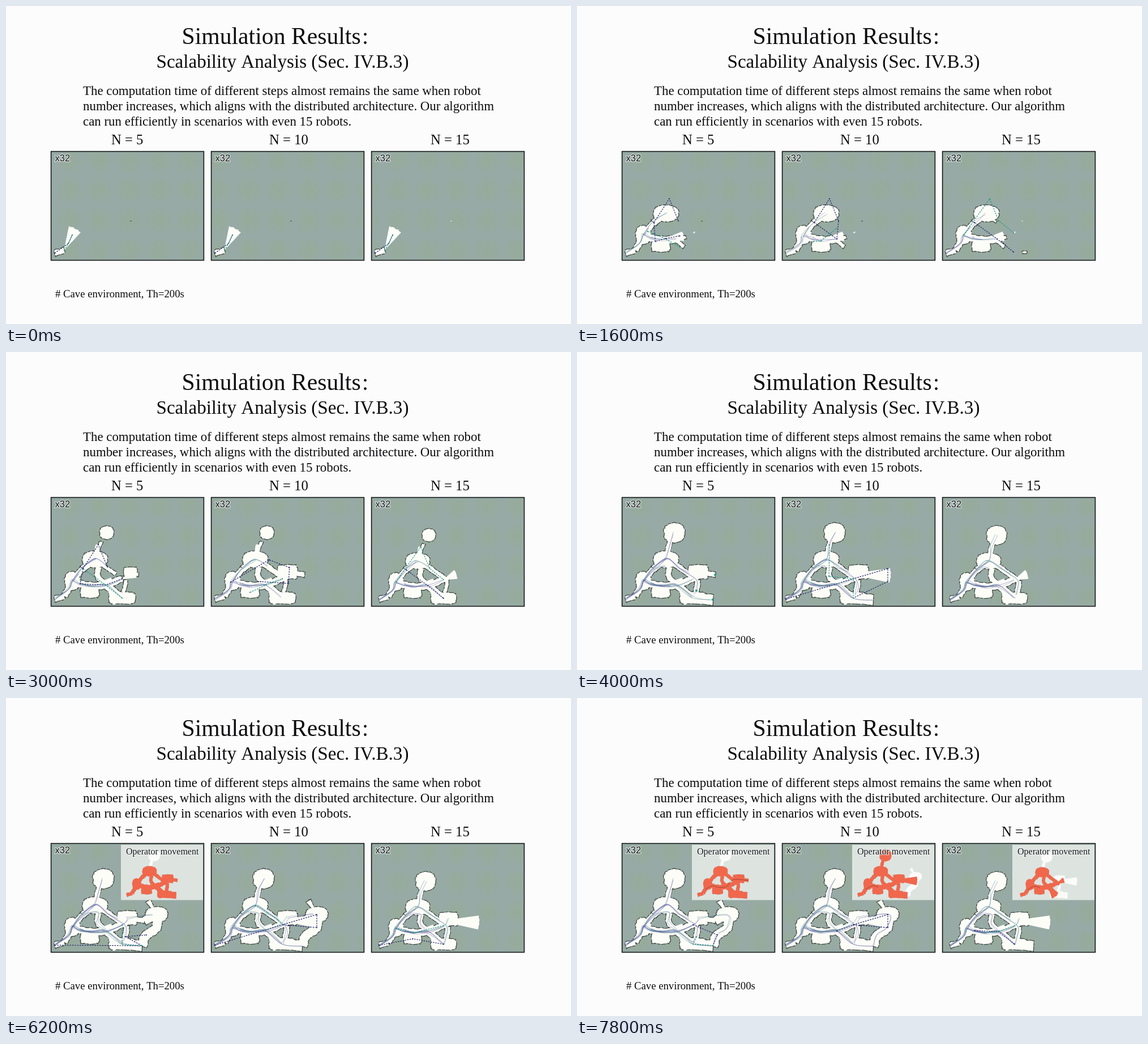
These frames come from a looping animation (998 by 561 pixels, 8 s). An HTML page with a canvas:

```html
<!DOCTYPE html>
<html lang="en">
<head>
<meta charset="utf-8">
<title>Scalability Analysis</title>
<style>
html, body { margin: 0; width: 100%; height: 100%; overflow: hidden; background: #fcfcfd; }
canvas { display: block; width: 998px; height: 561px; }
</style>
</head>
<body>
<canvas id="stage" width="998" height="561"></canvas>
<script>
const ctx = document.getElementById('stage').getContext('2d');
const LOOP = 8000, STEP = 200, GROW = 600, NEVER = 1e6;
const SERIF = '"Liberation Serif", serif', SANS = '"Liberation Sans", sans-serif';
const NAVY = '#25256f', TEAL = '#1f9a86', RED = '#f0674c', FREE = '#fdfdf8';
const PITCH = 283;

const clamp = v => Math.max(0, Math.min(1, v));
const noise = n => { const s = Math.sin(n * 127.1 + 11.7) * 43758.5453; return s - Math.floor(s) - 0.5; };

// Waypoints of the cave; every corridor, track and link is a word of these letters.
const way = {
  E: [86, 436], K: [103, 431], J: [110, 419], L: [117, 404], N: [136, 382], C: [157, 366], H: [163, 340], T: [172, 319],
  M: [131, 409], B: [150, 413], D: [176, 411], P: [148, 424], Q: [164, 379], O: [162, 396], U: [179, 379], X: [197, 391],
  V: [213, 402], Z: [211, 421], W: [205, 400], R: [214, 388], I: [244, 393], S: [205, 434], G: [240, 437],
  F: [266, 382], A: [266, 405], Y: [248, 418]
};
const spots = word => [...word].map(key => way[key]);

// Smooth curve through points, cut off at the given share of its length.
function spline(pts, done = 1) {
  const n = pts.length - 1, out = [];
  const at = i => pts[Math.max(0, Math.min(n, i))];
  for (let k = 0; k <= Math.floor(done * n * 10); k++) {
    const i = Math.min(n - 1, Math.floor(k / 10)), u = k / 10 - i;
    const [a, b, c, d] = [at(i - 1), at(i), at(i + 1), at(i + 2)];
    out.push([0, 1].map(j => b[j] + 0.5 * u * (c[j] - a[j] +
      u * (2 * a[j] - 5 * b[j] + 4 * c[j] - d[j] + u * (3 * (b[j] - c[j]) + d[j] - a[j])))));
  }
  return out;
}

const round = (v, power) => Math.sign(v) * Math.abs(v) ** (2 / power);

function room(key, rx, ry, power = 2.4) {
  const [x, y] = way[key];
  return Array.from({ length: 44 }, (_, i) => {
    const a = i / 44 * Math.PI * 2;
    return [x + rx * round(Math.cos(a), power), y + ry * round(Math.sin(a), power)];
  });
}

function corridor(word, width) {
  const mid = spline(spots(word)).filter((_, i) => i % 2 === 0);
  const side = sign => mid.map(([x, y], i) => {
    const [a, b] = [mid[Math.max(0, i - 1)], mid[Math.min(mid.length - 1, i + 1)]];
    const f = sign * width / 2 / Math.hypot(b[0] - a[0], b[1] - a[1]);
    return [x - (b[1] - a[1]) * f, y + (b[0] - a[0]) * f];
  });
  return [...side(1), ...side(-1).reverse()];
}

function fan(key, degrees, spread, r) {
  const [x, y] = way[key];
  const arc = Array.from({ length: 9 }, (_, i) => {
    const a = (degrees + spread * (i / 4 - 1)) * Math.PI / 180;
    return [x + r * Math.cos(a), y + r * Math.sin(a)];
  });
  return [[x, y], ...arc];
}

// Areas of the map: when each view discovers them, whether walls are seen, and a ragged outline.
const areas = [];
function area(name, times, wall, outline) {
  const seed = areas.length * 100;
  const pts = outline.map(([x, y], i) => [x + noise(seed + i) * 1.8, y + noise(seed + i + 0.5) * 1.8]);
  areas.push({ name, times: [times].flat(), wall, pts });
}
area('entry', -GROW, true, corridor('EK', 10));
area('fan', -GROW, false, fan('K', -64, 15, 43));
area('left', 0, true, room('L', 13, 16));
area('left', 0, true, corridor('KJL', 11));
area('left', 0, true, corridor('LN', 10));
area('lower', 0, true, corridor('LMBD', 13));
area('bottom', 0, true, room('P', 16, 9, 6));
area('tongue', 200, false, fan('B', -10, 12, 39));
area('neck', 100, true, corridor('NC', 12));
area('chamber', 200, true, room('C', 22, 14));
area('lower', 1300, true, corridor('DW', 11));
area('lower', 1300, true, corridor('DS', 12));
area('blob', 1500, false, fan('D', 52, 17, 38));
area('tip', 1500, false, fan('W', -22, 18, 26));
area('shaft', 1500, false, corridor('CH', 8));
area('top', 2600, true, corridor('CHT', 8));
area('top', 2600, true, room('T', 18, 17));
area('upper', [2600, 2400, 1400], true, corridor('CUXV', 9));
area('upper', 2400, true, corridor('QOD', 9));
area('link', 2600, true, corridor('VZS', 9));
area('south', [2400, 2400, 1500], true, room('S', 23, 10, 5));
area('south', [2800, 2800, 6600], true, corridor('SG', 17));
area('room', [2600, 1600, 5400], true, room('R', 17, 12, 7));
area('room', [2600, 1600, 5400], true, corridor('RI', 8));
area('east', [NEVER, 2800, 5400], false, fan('X', 2, 10, 74));
area('far', [5500, 5600, NEVER], true, room('F', 19, 13));
area('far', [5500, 5600, NEVER], true, fan('F', -122, 10, 28));
area('far', [5500, 5600, NEVER], true, corridor('FAYG', 16));
area('far', [5500, 5600, NEVER], true, corridor('FI', 15));

const tracks = [
  ['EJLNC', 0], ['EJLMB', 0], ['LMBD', 400], ['LNCU', 1400], ['MBDW', 1500], ['MBDS', 1700], ['EJLNCHT', 2600],
  ['NCUX', 2700], ['LMBDS', 3000], ['DSG', 3000], ['UXVZS', 3200], ['EJLMBDWR', 3400], ['LNQOD', 3600], ['RFAYG', 6000]
];
const trackColors = ['rgba(96,92,168,.5)', 'rgba(52,140,132,.55)', 'rgba(120,112,160,.45)', 'rgba(70,76,150,.5)'];

// Links between robots at key times; a single letter is a lone robot.
const linkTimes = [0, 800, 2200, 4000, 5400, 6200, 7800];
const links = [
  ['EJL KJL', 'NPMB JLB', 'NMDW NDS NHU', 'I Z G', 'EGXU RIG', 'EGZY WSG', 'WYGS ZSG'],
  ['EJL KJL', 'NPLB LJN', 'NHUDN PDW', 'EWFAS HOWS', 'EWFAG HTXZ', 'EWFAW CUXW', 'DWFAW'],
  ['EJL KJL', 'NPDL KPD', 'NDS LHUW', '', 'URZ NUXW EP', 'EPS LBW', 'MDS BDW']
].map(keys => keys.map(words => words.split(' ').map(spots)));

function linksAt(panel, t) {
  const i = linkTimes.findLastIndex(key => key <= t);
  const a = links[panel][i], b = links[panel][i + 1];
  if (!b) return a;
  const f = (t - linkTimes[i]) / (linkTimes[i + 1] - linkTimes[i]);
  return (f < 0.5 ? a : b).map((line, n) => {
    if (!a[n] || !b[n] || a[n].length !== b[n].length) return line;
    return a[n].map(([x, y], k) => [x + (b[n][k][0] - x) * f, y + (b[n][k][1] - y) * f]);
  });
}

function trace(pts, s = 1) {
  const [ox, oy] = pts[0] || [0, 0];
  ctx.beginPath();
  pts.forEach(([x, y]) => ctx.lineTo(ox + (x - ox) * s, oy + (y - oy) * s));
}

function dot(x, y, r, color) {
  ctx.fillStyle = color;
  ctx.beginPath();
  ctx.arc(x, y, r, 0, 7);
  ctx.fill();
}

function text(str, x, y, size, family = SERIF, color = '#0c0c0e') {
  ctx.font = size + 'px ' + family;
  ctx.fillStyle = color;
  ctx.fillText(str, x, y);
}

function haloText(str, x, y, size, family) {
  ctx.font = size + 'px ' + family;
  ctx.strokeStyle = 'rgba(240,244,244,.75)';
  ctx.lineWidth = 2.4;
  ctx.lineJoin = 'round';
  ctx.strokeText(str, x, y);
  text(str, x, y, size, family, '#16181a');
}

// The third view zooms out slightly once the map has grown.
function fitMap(panel, t) {
  if (panel === 2 && t >= 3000) {
    ctx.translate(11, 15.6);
    ctx.scale(0.955, 0.965);
  }
}

const known = (panel, t) => areas
  .map(a => ({ a, s: clamp((t - (a.times[panel] ?? a.times[0])) / GROW) }))
  .filter(o => o.s > 0);

function paint(list, wall, width, fill) {
  ctx.strokeStyle = wall;
  ctx.lineWidth = width;
  list.filter(o => o.a.wall).forEach(({ a, s }) => { trace(a.pts, s); ctx.closePath(); ctx.stroke(); });
  ctx.fillStyle = fill;
  list.forEach(({ a, s }) => { trace(a.pts, s); ctx.fill(); });
}

function drawTracks(panel, t) {
  ctx.lineWidth = 0.9;
  tracks.forEach(([word, from], r) => {
    if (t < from || (panel === 2 && /[FG]/.test(word))) return;
    for (let c = 0; c < 2; c++) {
      const pts = spots(word).map(([x, y], i) => {
        const id = panel * 300 + c * 120 + r * 8 + i;
        return [x + noise(id) * 5, y + noise(id + 0.4) * 5];
      });
      ctx.strokeStyle = trackColors[(r + c + panel) % trackColors.length];
      trace(spline(pts, clamp((t - from) / 900)));
      ctx.stroke();
    }
  });
}

function drawLinks(panel, t) {
  ctx.lineWidth = 1.2;
  ctx.setLineDash([2.6, 1.8]);
  linksAt(panel, t).forEach((pts, n) => {
    const lone = pts.length === 1;
    const color = lone || n % 2 ? TEAL : NAVY;
    ctx.strokeStyle = color;
    trace(pts);
    ctx.stroke();
    pts.forEach(([x, y]) => dot(x, y, lone ? 2 : 1.1, color));
  });
  ctx.setLineDash([]);
}

// Small overview with the ground the operator has covered in red.
const insetStart = [6000, 6800, 7200];
const uncovered = [/top|shaft/, /far/, /top|shaft|room|east|south|link/];

function drawInset(panel, t) {
  if (t < insetStart[panel]) return;
  ctx.save();
  ctx.beginPath();
  ctx.rect(203, 259, 145, 97.5);
  ctx.clip();
  ctx.fillStyle = '#dde4e0';
  ctx.fillRect(203, 259, 145, 98);
  ctx.save();
  ctx.translate(212, 353);
  ctx.scale(1 / 1.766, 1 / 1.67);
  ctx.translate(-84, -445);
  fitMap(panel, t);
  const list = known(panel, t).filter(o => panel || o.a.name !== 'far');
  const bare = o => uncovered[panel].test(o.a.name);
  paint(list.filter(bare), '#e6e8e6', 2, '#fbfbfa');
  paint(list.filter(o => !bare(o)), '#d9836f', 2, RED);
  if (t >= 7000) {
    ctx.strokeStyle = 'rgba(70,40,40,.75)';
    ctx.lineWidth = 1.2;
    trace(spline(spots(panel ? 'JMB' : 'JMBDXI'), clamp((t - 6800) / 1000)));
    ctx.stroke();
  }
  ctx.restore();
  haloText('Operator movement', 212, 276, 16, SERIF);
  ctx.restore();
}

// Faint green mottling on a grid shared by all three views.
function drawGround(shift) {
  ctx.fillStyle = '#97aaa5';
  ctx.fillRect(79, 256, 271, 193);
  for (let x = 59.5 - shift; x < 380; x += 52.7) {
    for (let y = 272; y < 450; y += 53) {
      const g = ctx.createRadialGradient(x, y, 3, x, y, 25);
      g.addColorStop(0, 'rgba(150,172,148,.6)');
      g.addColorStop(1, 'rgba(150,172,148,0)');
      ctx.fillStyle = g;
      ctx.fillRect(x - 25, y - 25, 50, 50);
    }
  }
}

function drawPanel(panel, t) {
  const shift = panel * PITCH;
  ctx.save();
  ctx.translate(shift, 0);
  ctx.save();
  ctx.beginPath();
  ctx.rect(79, 256, 271, 193);
  ctx.clip();
  drawGround(shift);
  if (t < 2400) {
    ctx.fillStyle = panel < 2 ? '#3c4644' : '#e4eae4';
    ctx.fillRect(219, 379, 3, 1);
  }
  ctx.save();
  fitMap(panel, t);
  ctx.setLineDash([9, 1.5, 5, 2]);
  paint(known(panel, t), 'rgba(48,52,46,.85)', 2.6, FREE);
  ctx.setLineDash([]);
  drawTracks(panel, t);
  drawLinks(panel, t);
  ctx.restore();
  drawInset(panel, t);
  haloText('x32', 86.5, 274, 16.5, SANS);
  ctx.restore();
  ctx.strokeStyle = '#14191a';
  ctx.lineWidth = 1.6;
  ctx.strokeRect(79.6, 256.6, 269.8, 192);
  ctx.restore();
}

function drawText() {
  text('Simulation Results', 310.5, 66.5, 41.7);
  text(':', 629, 66.5, 40);
  text('Scalability Analysis (Sec. IV.B.3)', 265.5, 109, 33.1);
  [
    'The computation time of different steps almost remains the same when robot',
    'number increases, which aligns with the distributed architecture. Our algorithm',
    'can run efficiently in scenarios with even 15 robots.'
  ].forEach((line, i) => text(line, 136, 157 + i * 27.2, 22.88));
  text('N = 5', 186, 244, 24.7);
  text('N = 10', 465, 244, 24.7);
  text('N = 15', 750, 244, 24.7);
  text('# Cave environment, Th=200s', 87, 514, 18.73);
}

function render(now) {
  const t = Math.floor((now % LOOP) / STEP) * STEP;
  ctx.fillStyle = '#fcfcfd';
  ctx.fillRect(0, 0, 998, 561);
  drawText();
  for (let p = 0; p < 3; p++) drawPanel(p, t);
}

const start = performance.now();
function tick() {
  render(performance.now() - start);
  requestAnimationFrame(tick);
}
tick();
</script>
</body>
</html>
```
